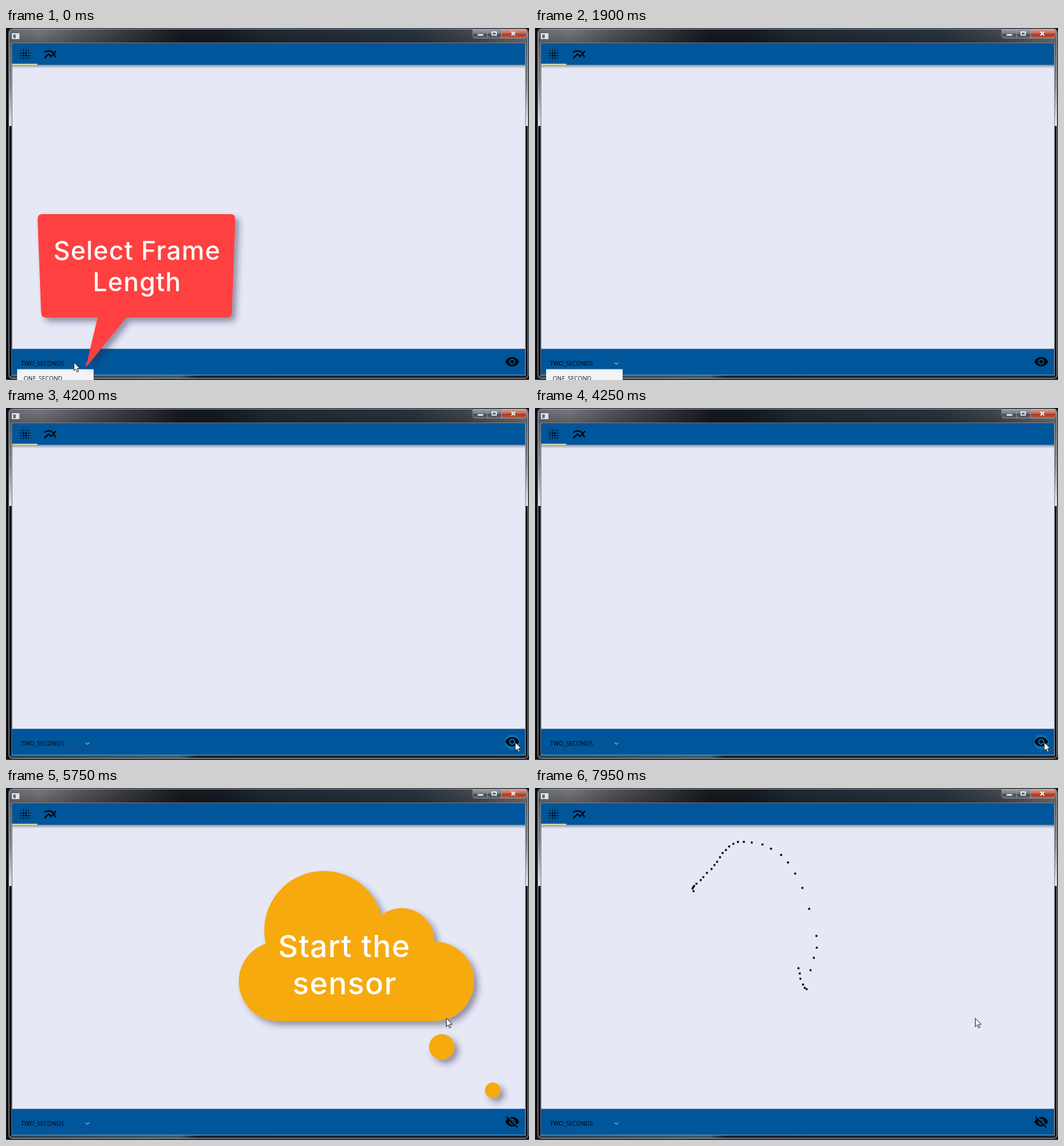
These frames come from a looping animation (800x539 px, 8 s). An HTML page:

```html
<!DOCTYPE html>
<html lang="en">
<head>
<meta charset="utf-8">
<title>Sensor frame demo</title>
<style>
html, body { margin: 0; width: 100%; height: 100%; overflow: hidden; background: #0b0e17; }
svg { display: block; width: 100%; height: 100%; }
.ui { font: 9.1px "Open Sans", "Noto Sans", sans-serif; }
.note { font-family: Inter, "Open Sans", sans-serif; font-weight: 500; fill: #fff; text-anchor: middle; }
</style>
</head>
<body>
<svg viewBox="0 0 800 539" xmlns="http://www.w3.org/2000/svg">
  <defs>
    <linearGradient id="title">
      <stop offset="0" stop-color="#6c6d72"/>
      <stop offset=".06" stop-color="#77787e"/>
      <stop offset=".13" stop-color="#5a5b61"/>
      <stop offset=".22" stop-color="#3b3d43"/>
      <stop offset=".33" stop-color="#171b21"/>
      <stop offset=".4" stop-color="#141b22"/>
      <stop offset=".5" stop-color="#202b35"/>
      <stop offset=".78" stop-color="#283541"/>
      <stop offset=".88" stop-color="#42484f"/>
      <stop offset="1" stop-color="#76797e"/>
    </linearGradient>
    <linearGradient id="shade" x2="0" y2="1">
      <stop offset="0" stop-color="#000" stop-opacity="0"/>
      <stop offset="1" stop-color="#000" stop-opacity=".22"/>
    </linearGradient>
    <linearGradient id="glow" x2="0" y2="1">
      <stop offset="0" stop-color="#5b5e63"/>
      <stop offset=".5" stop-color="#85888c"/>
      <stop offset="1" stop-color="#e4e5e7"/>
    </linearGradient>
    <linearGradient id="drop" x2="0" y2="1">
      <stop offset="0" stop-color="#4a5468" stop-opacity=".6"/>
      <stop offset="1" stop-color="#4a5468" stop-opacity="0"/>
    </linearGradient>
    <linearGradient id="glass" x2="0" y2="1">
      <stop offset="0" stop-color="#9ba1a7"/>
      <stop offset=".5" stop-color="#70777e"/>
      <stop offset=".5" stop-color="#414850"/>
      <stop offset="1" stop-color="#5f666d"/>
    </linearGradient>
    <linearGradient id="red" x2="0" y2="1">
      <stop offset="0" stop-color="#d9a398"/>
      <stop offset=".5" stop-color="#c0604f"/>
      <stop offset=".5" stop-color="#a53421"/>
      <stop offset="1" stop-color="#bf5a42"/>
    </linearGradient>
    <linearGradient id="floor">
      <stop offset="0" stop-color="#2c4450"/>
      <stop offset=".33" stop-color="#3a5c66"/>
      <stop offset=".36" stop-color="#1c232b"/>
      <stop offset="1" stop-color="#1d242b"/>
    </linearGradient>
    <filter id="soft" x="-20%" y="-20%" width="150%" height="150%">
      <feDropShadow dx="6" dy="6" stdDeviation="5" flood-color="#23264a" flood-opacity=".45"/>
    </filter>
  </defs>

  <!-- window frame -->
  <rect width="800" height="539" fill="#0b0e17"/>
  <rect x="4.500" y="1.500" width="794" height="535" rx="5" fill="#0c0f15"/>
  <path d="M5 23V7q0-5 5-5H793q5 0 5 5V23z" fill="url(#title)"/>
  <path d="M5 23V7q0-5 5-5H793q5 0 5 5V23z" fill="url(#shade)"/>
  <path d="M5 23h4v127h-4zM795 23h4v127h-4z" fill="url(#glow)"/>
  <rect x="5" y="532" width="793" height="4" fill="url(#floor)"/>
  <rect x="4.500" y="1.500" width="794" height="535" rx="5" fill="none" stroke="#a7adb3"/>
  <rect x="9" y="23" width="785.500" height="508.500" fill="none" stroke="#8f989f"/>
  <path d="M0 538.500h800" stroke="#4b5258"/>
  <rect x="9" y="8" width="11.500" height="9" fill="#dfe3e6"/>
  <rect x="11" y="10" width="4" height="5.500" fill="#536f91"/>

  <!-- caption buttons -->
  <path d="M714 2h44v13.500h-40q-4 0-4-4z" fill="url(#glass)" stroke="#8b949c" stroke-width=".8"/>
  <path d="M758 2h38v9.500q0 4-4 4h-34z" fill="url(#red)" stroke="#a7a1a1" stroke-width=".8"/>
  <path d="M736.500 2v13.500" stroke="#929aa2" stroke-width=".8"/>
  <rect x="721.500" y="9.500" width="8.500" height="2.200" fill="#fff"/>
  <rect x="743.500" y="6" width="6.500" height="4.800" fill="none" stroke="#fff" stroke-width="1.500"/>
  <path d="M773.200 5.700l5.600 5.600m0-5.600l-5.600 5.600" stroke="#fff" stroke-width="1.700"/>

  <!-- content -->
  <rect x="9.500" y="56" width="784.500" height="436" fill="#e6e8f5"/>
  <rect x="9.500" y="56" width="784.500" height="6" fill="url(#drop)"/>
  <rect x="9.500" y="24" width="784.500" height="32.400" fill="#00569a"/>
  <rect x="9.500" y="54.800" width="38.500" height="1.800" fill="#f3eda9"/>
  <g id="blur" transform="translate(17.300 28.900) scale(.95)"/>
  <path transform="translate(56 29.300) scale(.96)" d="M22 6.920l-1.410-1.410-2.850 3.210C15.680 6.400 12.830 5 9.610 5 6.720 5 4.070 6.160 2 8l1.420 1.420C5.120 7.930 7.270 7 9.610 7c2.740 0 5.090 1.260 6.770 3.240l-2.880 3.240-4-4L2 16.990l1.500 1.500 6-6.010 4 4 4.050-4.550c.75 1.350 1.250 2.900 1.440 4.550H21c-.22-2.300-.95-4.390-2.040-6.140L22 6.920z"/>
  <rect x="9.500" y="491.500" width="784.500" height="39.500" fill="#00569a"/>
  <path d="M9.500 491.500h784.500" stroke="#3f6f9d" stroke-width=".8"/>
  <g id="trail"/>

  <!-- footer controls -->
  <text class="ui" x="23" y="516.700">TWO_SECONDS</text>
  <path d="M121.700 512.500l2.800 2.500 2.800-2.500" fill="none" stroke="#9ba6b3" stroke-width="1.200"/>
  <path d="M17 523.500h116" stroke="#28496f" stroke-dasharray="2 1"/>
  <path id="focus" d="M17 523.500h116" stroke="#7a50c0" stroke-dasharray="2 1"/>
  <circle id="hover" cx="774.500" cy="511.500" r="11.500" fill="#0a70b4"/>
  <g transform="translate(762.900 499.600) scale(.95)">
    <path id="eye" d="M12 4.500C7 4.500 2.730 7.610 1 12c1.730 4.390 6 7.500 11 7.500s9.270-3.110 11-7.500c-1.730-4.390-6-7.500-11-7.500zM12 17c-2.760 0-5-2.240-5-5s2.240-5 5-5 5 2.240 5 5-2.240 5-5 5zm0-8c-1.660 0-3 1.340-3 3s1.340 3 3 3 3-1.340 3-3-1.340-3-3-3z"/>
    <path id="eyeOff" d="M12 7c2.760 0 5 2.240 5 5 0 .65-.13 1.260-.36 1.830l2.920 2.920c1.510-1.260 2.700-2.890 3.430-4.750-1.730-4.390-6-7.500-11-7.500-1.400 0-2.740.25-3.980.7l2.160 2.160C10.740 7.130 11.350 7 12 7zM2 4.270l2.280 2.280.46.46C3.080 8.300 1.780 10.020 1 12c1.730 4.390 6 7.500 11 7.500 1.550 0 3.030-.3 4.380-.84l.42.42L19.730 22 21 20.730 3.270 3 2 4.270zM7.530 9.800l1.550 1.550c-.05.21-.08.43-.08.65 0 1.660 1.340 3 3 3 .22 0 .44-.03.65-.08l1.550 1.550c-.67.33-1.410.53-2.200.53-2.760 0-5-2.240-5-5 0-.79.2-1.530.53-2.200zm4.310-.78l3.150 3.150.02-.16c0-1.660-1.340-3-3-3l-.17.01z"/>
  </g>
  <g id="popup">
    <rect x="17" y="522.500" width="117" height="20" fill="#f3f3f5"/>
    <text class="ui" x="27" y="539.800" fill="#16181c">ONE_SECOND</text>
  </g>

  <!-- callouts -->
  <g id="callout">
    <path filter="url(#soft)" fill="#ff4141" d="M56 285H343q8 0 7.700 8L345.500 436q-.3 7.500-8 7.500H184L122 520 140 443.500H61.500q-7.500 0-7.800-7.500L48.300 293q-.3-8 7.700-8z"/>
    <g class="note" font-size="39" letter-spacing="1">
      <text x="200.500" y="355">Select Frame</text>
      <text x="200.500" y="402.500">Length</text>
    </g>
  </g>
  <g id="cloud">
    <g filter="url(#soft)" fill="#f6aa0a">
      <circle cx="486" cy="218" r="91"/>
      <circle cx="605" cy="234" r="50"/>
      <rect x="356" y="235" width="360" height="122" rx="61"/>
      <circle cx="666.500" cy="396.500" r="19.500"/>
      <circle cx="744.500" cy="463" r="12"/>
    </g>
    <g class="note" font-size="47" letter-spacing="1.100">
      <text x="517.500" y="258.500">Start the</text>
      <text x="518" y="316">sensor</text>
    </g>
  </g>
  <path id="cursor" d="M0 0V12.800l2.900-2.700 2 4.700 2.100-.9-2-4.500h4z" fill="#fff" stroke="#15171c" stroke-width=".9"/>
</svg>
<script>
const LOOP = 8000, STEP = 50;
const $ = id => document.getElementById(id);

function addDot(parent, x, y, r) {
  const dot = document.createElementNS("http://www.w3.org/2000/svg", "circle");
  for (const [k, v] of Object.entries({ cx: x, cy: y, r })) dot.setAttribute(k, v);
  parent.append(dot);
  return dot;
}

// Dot grid icon: large in the middle, small at the rim.
const rows = [3, 6, 10, 14, 18, 21];
for (const x of rows) for (const y of rows) {
  const far = Math.max(Math.abs(x - 12), Math.abs(y - 12));
  const near = Math.min(Math.abs(x - 12), Math.abs(y - 12));
  if (far === 9 && near > 2) continue;
  addDot($("blur"), x, y, far === 2 ? 1.5 : far === 6 ? 1 : .6);
}

const path = [
  403,276, 405,284, 406,292, 410,301, 412.5,306, 415.5,308,
  421.5,279, 426.5,260, 431,244.5, 430.5,226.5, 419.5,185, 409,153,
  398,131, 387,114, 376.5,102.5, 361,93, 348,86.5, 331.5,83.5,
  319.5,82.5, 310.5,82.5, 303.5,85.5, 297,89.5, 292,95, 287,99.5,
  283,106, 278.5,113, 274.5,118, 270,124, 263,130, 257.5,136.5,
  253.5,141, 247,146.5, 243.5,150, 242,152, 241,154, 242.5,158
];
const dots = [];
for (let i = 0; i < path.length; i += 2)
  dots.push(addDot($("trail"), path[i], path[i + 1], 1.7));

// time, x, y
const moves = [
  [0, 104, 512], [450, 78, 541], [2750, 75, 541], [2800, 80, 525],
  [3050, 657, 466], [3200, 657, 466], [3450, 741.5, 513], [3650, 779, 512],
  [4450, 779, 512], [4650, 673.5, 352.5], [LOOP, 673.5, 352.5]
];

const ramp = (t, a, b) => Math.min(1, Math.max(0, (t - a) / (b - a)));
const ease = p => p * p * (3 - 2 * p);
const show = (id, on) => $(id).setAttribute("opacity", +on);

function cursorAt(t) {
  const i = moves.findIndex(m => m[0] > t);
  const [t0, x0, y0] = moves[i - 1], [t1, x1, y1] = moves[i];
  const p = ease(ramp(t, t0, t1));
  return [x0 + (x1 - x0) * p, y0 + (y1 - y0) * p];
}

function draw(time) {
  const t = Math.floor(time % LOOP / STEP) * STEP;
  show("callout", t < 1900);
  show("popup", 1 - ramp(t, 2250, 2400));
  show("focus", 1 - ramp(t, 3850, 4200));
  show("hover", ramp(t, 3550, 3750) * (1 - ramp(t, 5000, 5450)));
  show("cloud", t >= 4350 && t < 6000);
  show("eye", t < 5600);
  show("eyeOff", t >= 5600);
  $("cursor").setAttribute("transform", `translate(${cursorAt(t)})`);
  const count = Math.round(dots.length * ramp(t, 7100, 7950));
  dots.forEach((dot, i) => dot.setAttribute("opacity", +(i < count)));
}

const start = performance.now();
function tick() {
  draw(performance.now() - start);
  requestAnimationFrame(tick);
}
tick();
</script>
</body>
</html>
```
